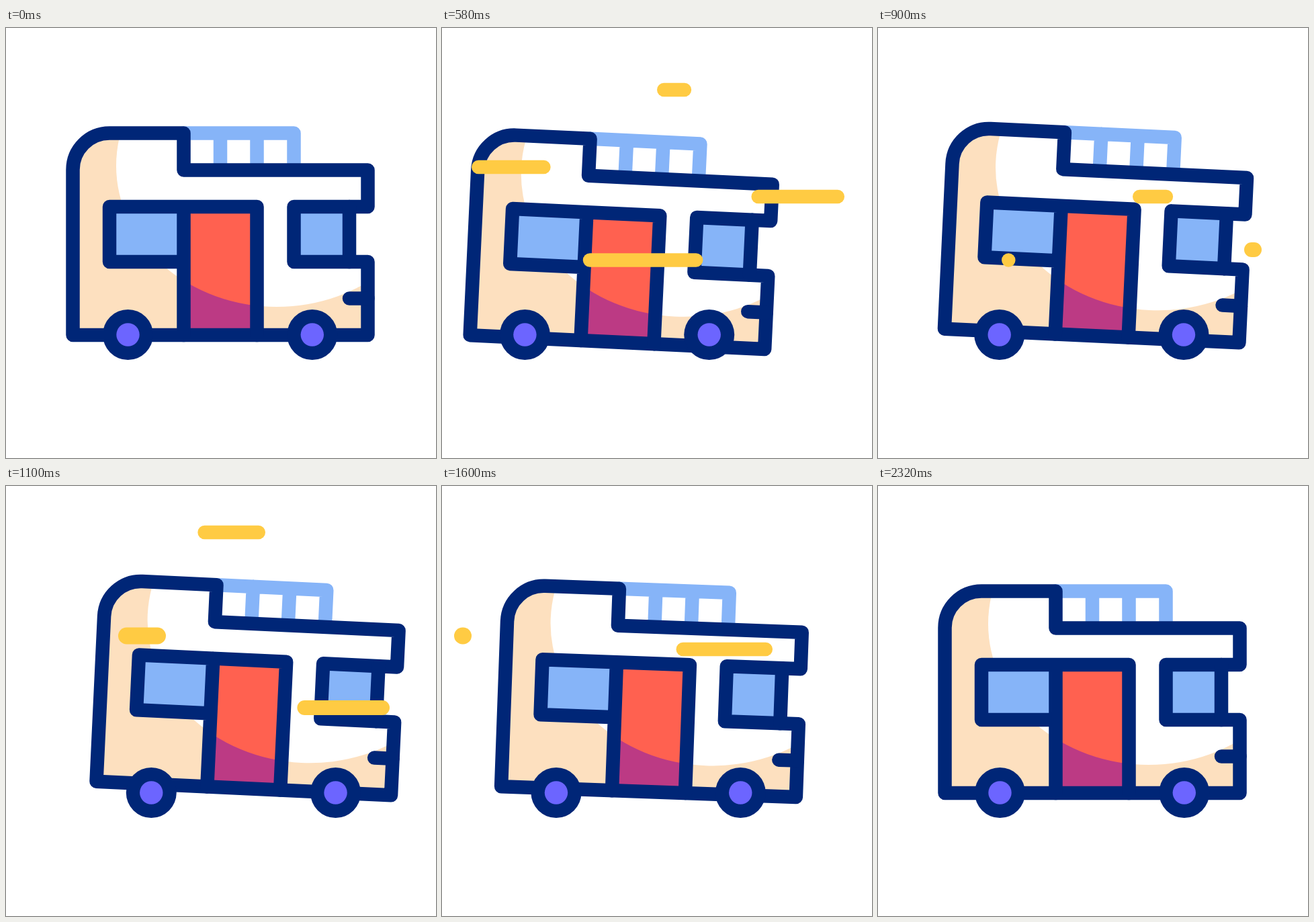
Recreate the animation shown at these times as an HTML page with a canvas. Size 640 by 640 pixels, loop 2.4 s.

```html
<!DOCTYPE html>
<html lang="en">
<head>
<meta charset="utf-8">
<title>Camper van</title>
<style>
  html, body { margin: 0; width: 100%; height: 100%; overflow: hidden; background: #fff; }
  canvas { display: block; width: 640px; height: 640px; }
</style>
</head>
<body>
<canvas id="stage" width="640" height="640"></canvas>
<script>
const ctx = document.getElementById('stage').getContext('2d');
const LOOP = 2400, STEP = 20, STROKE = 20.5;
const NAVY = '#002677', BLUE = '#86b4f8', CREAM = '#fde0bf', RED = '#ff6150',
      PLUM = '#bc3a84', VIOLET = '#6c65ff', YELLOW = '#ffcb43';

// Keyframes: [time, value], eased between neighbours.
const driveKeys = [[0, 0], [520, -60], [1200, 40], [1730, -20], [2320, 0]];
const liftKeys = [[0, 0], [560, 10.6], [1260, -9.5], [1740, 0]];
const tiltKeys = [[0, 0], [520, 2.7], [1450, 2.7], [1920, 0]];

// Speed lines draw from right to left, then their tail catches up.
const speedLines = [
  { y: 92, left: 320, right: 470, start: 80 },
  { y: 207, left: 44, right: 210, start: 177 },
  { y: 251, left: 379, right: 599, start: 390 },
  { y: 345.5, left: 184, right: 394, start: 305, grow: 362, lag: 235 },
  { y: 330, left: 402, right: 571, start: 864, width: 22 },
  { y: 69, left: 230, right: 386, start: 910 },
  { y: 223, left: 18, right: 238, start: 995, grow: 325, lag: 295, width: 25 },
  { y: 243, left: 330, right: 492, start: 1340 }
];

const bodyPath = new Path2D(
  'M99.5 457V211A54.5 54.5 0 0 1 154 156.5H264.5V211.5H538.5V266H428.5V348H538.5V457Z');
const detailPath = new Path2D(
  'M264.5 457V266H373.5V457M264.5 266H154V348H264.5M511 266V348M511 402.5H538.5');
const rackPath = new Path2D('M264.5 156.5H428.5V211M319 156.5V211M373.5 156.5V211');
const shine = new Path2D();
shine.ellipse(403, 205, 239, 210, 0, 0, Math.PI * 2);
const door = new Path2D('M264.5 266H373.5V457H264.5Z');

function ease(u) {
  u = Math.min(1, Math.max(0, u));
  return (1 - Math.cos(Math.PI * u)) / 2;
}

function valueAt(keys, t) {
  for (let i = 1; i < keys.length; i++) {
    const [t0, a] = keys[i - 1], [t1, b] = keys[i];
    if (t < t1) return a + (b - a) * ease((t - t0) / (t1 - t0));
  }
  return keys[keys.length - 1][1];
}

function stroke(path, color, width = STROKE) {
  ctx.strokeStyle = color;
  ctx.lineWidth = width;
  ctx.stroke(path);
}

function fill(path, color) {
  ctx.fillStyle = color;
  ctx.fill(path);
}

function shaded(path, shade, light) {
  ctx.save();
  ctx.clip(path);
  fill(path, shade);
  fill(shine, light);
  ctx.restore();
}

function disc(x, y, r, color) {
  ctx.fillStyle = color;
  ctx.beginPath();
  ctx.arc(x, y, r, 0, Math.PI * 2);
  ctx.fill();
}

function drawBody(t) {
  ctx.save();
  ctx.translate(319, 457 + valueAt(liftKeys, t));
  ctx.rotate(valueAt(tiltKeys, t) * Math.PI / 180);
  ctx.translate(-319, -457);
  stroke(rackPath, BLUE);
  shaded(bodyPath, CREAM, '#fff');
  shaded(door, PLUM, RED);
  ctx.fillStyle = BLUE;
  ctx.fillRect(154, 266, 110, 82);
  ctx.fillRect(428.5, 266, 82.5, 82);
  stroke(bodyPath, NAVY);
  stroke(detailPath, NAVY);
  ctx.restore();
}

function drawVan(t) {
  ctx.save();
  ctx.translate(valueAt(driveKeys, t), 0);
  drawBody(t);
  for (const x of [181.5, 455.8]) {
    disc(x, 456.5, 37.5, NAVY);
    disc(x, 456.5, 17.2, VIOLET);
  }
  ctx.restore();
}

function drawSpeedLine({ y, left, right, start, grow = 340, lag = 270, width = 20.5 }, t) {
  if (t < start || t > start + grow + lag) return;
  const from = right - width / 2;
  const span = right - left - width;
  const head = from - span * ease((t - start) / grow);
  const tail = from - span * ease((t - start - lag) / grow);
  const line = new Path2D();
  line.moveTo(tail, y);
  line.lineTo(Math.min(head, tail - 0.01), y);
  stroke(line, YELLOW, width);
}

function draw(now) {
  const t = Math.floor((now % LOOP) / STEP) * STEP;
  ctx.fillStyle = '#fff';
  ctx.fillRect(0, 0, 640, 640);
  ctx.lineCap = ctx.lineJoin = 'round';
  drawVan(t);
  for (const line of speedLines) drawSpeedLine(line, t);
}

function tick(now) {
  draw(now);
  requestAnimationFrame(tick);
}

draw(0);
requestAnimationFrame(tick);
</script>
</body>
</html>
```
